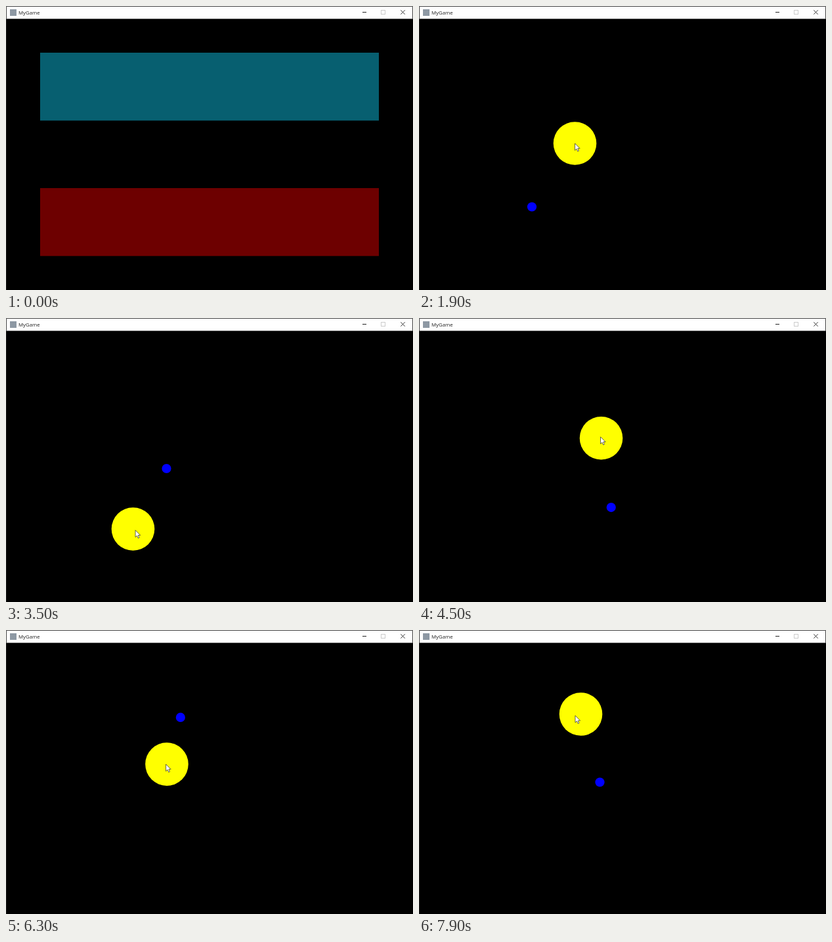
An HTML page for the animation above (8 s loop, 620x432 px).

```html
<!DOCTYPE html>
<html lang="en">
<head>
<meta charset="utf-8">
<title>MyGame</title>
<style>
  html, body { margin: 0; width: 100%; height: 100%; overflow: hidden; background: #000; }
  svg { display: block; width: 100%; height: 100%; }
  text { font: 7.8px "Open Sans", "Noto Sans", sans-serif; fill: #222; }
</style>
</head>
<body>
<svg viewBox="0 0 620 432">
  <rect width="620" height="432"/>
  <rect width="620" height="19.5" fill="#fff"/>
  <path d="M.5 20V.5H619.5V20" fill="none" stroke="#444"/>
  <path d="M.5 20V432" stroke="#1c1c1c"/>
  <rect x="6" y="5" width="10" height="10" fill="#8d98a3"/>
  <text x="19" y="12.7">MyGame</text>
  <g fill="none" stroke="#222">
    <path d="M543 9.5H549"/>
    <rect x="571.5" y="6.5" width="6" height="6" stroke="#ccc"/>
    <path d="M601.3 6.3L607.7 12.7M607.7 6.3L601.3 12.7" stroke-width=".9"/>
  </g>
  <g id="menu">
    <rect x="52" y="71" width="516" height="103.3" fill="#075f70"/>
    <rect x="52" y="277" width="516" height="103.3" fill="#6d0000"/>
  </g>
  <g id="game">
    <circle id="sun" r="32.8" fill="#ff0"/>
    <circle id="planet" r="7.1" fill="#00f"/>
  </g>
  <path id="cursor" d="M0 0V10.6L2.5 8.4L4.2 12.2L5.9 11.4L4.3 7.7H7.6Z" fill="#fff" stroke="#222" stroke-width=".7"/>
</svg>
<script>
const LOOP = 8000, STEP = 100, ENTER = 300, START = 900, LAG = 24;
const $ = id => document.getElementById(id);

// Turning points of the hand: time in ms, x, y
const hand = [
  [300, 505, 84], [500, 467, 112.5], [900, 467, 112.5], [1900, 237.5, 209],
  [2100, 237.5, 209], [2550, 206, 194], [3100, 145, 290], [3500, 193.5, 321],
  [3700, 230, 332], [4050, 304, 262], [4600, 275, 178], [5500, 276, 250.5],
  [6200, 250, 204], [7000, 210.5, 206.5], [7500, 348, 150], [7700, 316, 122],
  [7900, 246.5, 128], [8100, 185, 150]
];

// Orbit as circular arcs: time, x, y, degrees swept until the next point
const orbit = [
  [900, 155.7, 229.5, 30], [1900, 172, 305.5, 155], [3500, 244.5, 229, 195],
  [5500, 345, 232.5, 145], [7000, 160, 173.5, 100], [7900, 275.5, 231.5]
];

// Index of the span that holds t, and how far along it t is
function locate(path, t) {
  const next = path.findIndex(p => p[0] > t);
  const i = Math.max((next < 0 ? path.length - 1 : next) - 1, 0);
  const u = (t - path[i][0]) / (path[i + 1][0] - path[i][0]);
  return [i, Math.min(Math.max(u, 0), 1)];
}

// The hand comes to rest on an axis wherever it turns back
function slope(path, i, k) {
  const p = path[i - 1], q = path[i], r = path[i + 1];
  if (!p || !r || (q[k] - p[k]) * (r[k] - q[k]) <= 0) return 0;
  return (r[k] - p[k]) / (r[0] - p[0]);
}

function handAt(t) {
  const [i, u] = locate(hand, t), v = 1 - u;
  const a = hand[i], b = hand[i + 1], span = b[0] - a[0];
  return [1, 2].map(k =>
    v * v * ((1 + 2 * u) * a[k] + u * span * slope(hand, i, k)) +
    u * u * ((1 + 2 * v) * b[k] - v * span * slope(hand, i + 1, k)));
}

function planetAt(t) {
  const [i, u] = locate(orbit, t);
  const [, x, y, degrees] = orbit[i], [, endX, endY] = orbit[i + 1];
  const sweep = degrees * Math.PI / 180, k = 2 * Math.tan(sweep / 2);
  const cx = (x + endX) / 2 + (endY - y) / k;
  const cy = (y + endY) / 2 - (endX - x) / k;
  const c = Math.cos(sweep * u), s = Math.sin(sweep * u);
  return [cx + (x - cx) * c + (y - cy) * s, cy - (x - cx) * s + (y - cy) * c];
}

const show = (id, on) => $(id).setAttribute("visibility", on ? "visible" : "hidden");
const place = (id, [x, y]) => $(id).setAttribute("transform", `translate(${x} ${y})`);

function draw(time) {
  const t = Math.floor(time % LOOP / STEP) * STEP;
  show("menu", t < START);
  show("game", t >= START);
  show("cursor", t >= ENTER);
  place("sun", handAt(t));
  place("planet", planetAt(t));
  place("cursor", handAt(t + LAG));
}

const began = performance.now();
function tick() {
  draw(performance.now() - began);
  requestAnimationFrame(tick);
}
tick();
</script>
</body>
</html>
```
